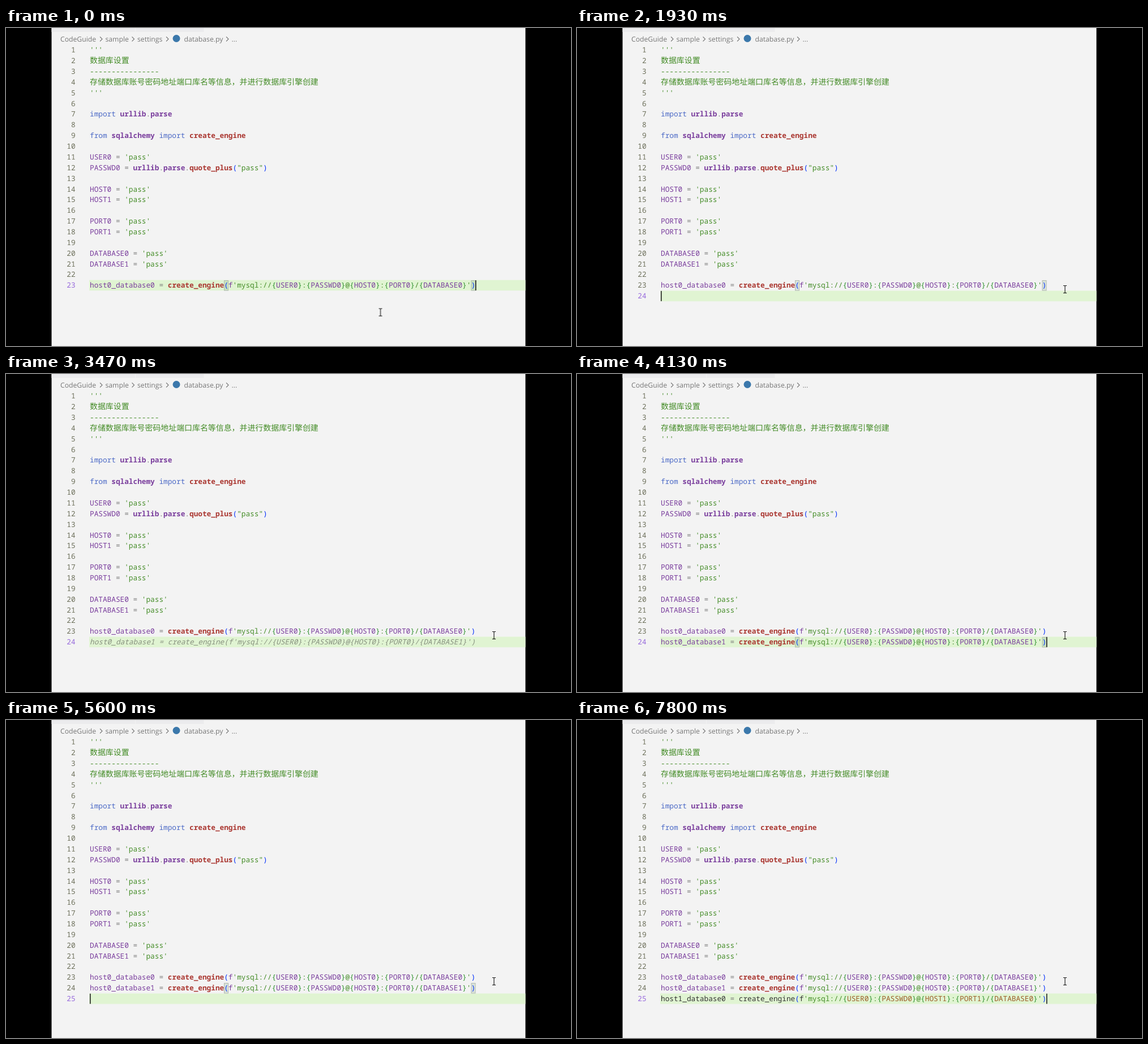
Animation of 998x561 px, one loop 8000 ms. Source, as an HTML page:

```html
<!DOCTYPE html>
<html lang="zh-CN">
<head>
<meta charset="utf-8">
<title>Editor completion</title>
<style>
html, body { margin: 0; width: 100%; height: 100%; overflow: hidden; background: #000; }
svg { display: block; width: 998px; height: 561px; }
text { font: 12.75px "Noto Sans Mono", "DejaVu Sans Mono", monospace; text-rendering: geometricPrecision; }
.crumb { font: 12.2px "Open Sans", "Noto Sans", sans-serif; fill: #777; }
.chev { fill: none; stroke: #777; stroke-width: 1.1; }
.num { fill: #6d705b; text-anchor: end; }

/* syntax colours */
.key { fill: #4b69c6; }
.mod { fill: #7a3e9d; font-weight: 700; }
.fn { fill: #aa3731; font-weight: 700; }
.str { fill: #448c27; }
.cjk { font: 13.93px "Noto Sans CJK SC", "Noto Sans CJK", sans-serif; fill: #448c27; }
.par { fill: #0431fa; }
.brace { fill: #319331; }
.const, .var { fill: #7a3e9d; }
.op { fill: #777; }
.raw .const { fill: #9c5d27; }
.raw .var, .raw .fn { fill: #333; font-weight: 400; }
.ghost text { fill: #87917f; font-style: italic; font-weight: 400; }

/* one shared 8 s timeline, 1% = 80 ms */
.t { animation: 8s step-end infinite; }
#bar { animation-name: bar; }
#match { animation-name: match; }
#caret { animation-name: caret; }
#mouse { animation: mouse 8s linear infinite; }
#n23 { animation-name: n23; }
#n24 { animation-name: n24; }
#n25 { animation-name: n25; }
#ghost24 { animation-name: ghost24; }
#raw24 { animation-name: raw24; }
#done24 { animation-name: done24; }
#ghost25 { animation-name: ghost25; }
#raw25 { animation-name: raw25; }

@keyframes bar {
  0% { transform: none; }
  23.375% { transform: translateY(18.87px); }
  69.125%, 100% { transform: translateY(37.74px); }
}
@keyframes match {
  0% { opacity: 1; transform: none; }
  26.625% { opacity: 0; transform: none; }
  51.625% { opacity: 1; transform: translateY(18.87px); }
  73.375%, 100% { opacity: 0; transform: translateY(18.87px); }
}
@keyframes caret {
  0%, 8.75%, 21.9% { opacity: 1; transform: translate(681px, 0); }
  2.5%, 15% { opacity: 0; transform: translate(681px, 0); }
  23.375%, 37.5% { opacity: 1; transform: translate(0, 18.87px); }
  30%, 42.5% { opacity: 0; transform: translate(0, 18.87px); }
  47.5%, 60% { opacity: 1; transform: translate(681px, 18.87px); }
  53.75%, 65.875% { opacity: 0; transform: translate(681px, 18.87px); }
  69.125%, 87.5% { opacity: 1; transform: translate(0, 37.74px); }
  75.375%, 93.75% { opacity: 0; transform: translate(0, 37.74px); }
  94.125%, 100% { opacity: 1; transform: translate(681px, 37.74px); }
}
@keyframes mouse {
  0%, .875% { transform: translate(661.5px, 501.5px); }
  6.625%, 7.875% { transform: translate(758px, 487px); }
  9.125%, 100% { transform: translate(862px, 461px); }
}
@keyframes n23 { 0% { fill: #9769dc; } 23.375%, 100% { fill: #6d705b; } }
@keyframes n24 {
  0% { opacity: 0; fill: #9769dc; }
  23.375% { opacity: 1; fill: #9769dc; }
  69.125%, 100% { opacity: 1; fill: #6d705b; }
}
@keyframes n25 { 0% { opacity: 0; fill: #9769dc; } 69.125%, 100% { opacity: 1; fill: #9769dc; } }
@keyframes ghost24 { 0%, 47.5%, 100% { opacity: 0; } 35% { opacity: 1; } }
@keyframes raw24 { 0%, 51.625%, 100% { opacity: 0; } 47.5% { opacity: 1; } }
@keyframes done24 { 0% { opacity: 0; } 51.625%, 100% { opacity: 1; } }
@keyframes ghost25 { 0%, 94.125%, 100% { opacity: 0; } 80.75% { opacity: 1; } }
@keyframes raw25 { 0% { opacity: 0; } 94.125%, 100% { opacity: 1; } }
</style>
</head>
<body>
<svg viewBox="0 0 998 561">
  <rect width="998" height="561"/>
  <rect x="80.5" width="837" height="561" fill="#f3f3f3"/>
  <rect x="80.5" width="269" height="7" fill="#ebebed"/>
  <rect x="228" width="1" height="7" fill="#f3f3f3"/>

  <text class="crumb" x="96" y="23.6">CodeGuide</text>
  <text class="crumb" x="175.5" y="23.6">sample</text>
  <text class="crumb" x="232" y="23.6">settings</text>
  <circle cx="301" cy="18.5" r="6.5" fill="#3b78ab"/>
  <text class="crumb" x="314.5" y="23.6">database.py</text>
  <text class="crumb" x="398.5" y="23.6">...</text>
  <path class="chev" d="M166 15.5l4 4-4 4M222.500 15.5l4 4-4 4M283 15.5l4 4-4 4M389 15.5l4 4-4 4"/>

  <rect id="bar" class="t" x="147" y="444.6" width="770.5" height="18.6" fill="#e0f4d2"/>
  <g id="match" class="t" fill="#006400" fill-opacity=".1" stroke="#b0b8ae">
    <rect x="385.500" y="445.500" width="7" height="17.500"/>
    <rect x="822" y="445.500" width="7" height="17.500"/>
  </g>
  <g id="code"></g>
  <rect id="caret" class="t" x="148" y="445" width="1.6" height="18" fill="#222"/>
  <path id="mouse" d="M-3-6.500h2q1 0 1 1q0-1 1-1h2M0-5.500v11M-3 6.500h2q1 0 1-1q0 1 1 1h2" fill="none" stroke="#111" stroke-width="1.1"/>
</svg>
<script>
const LEFT = 148, CHAR = 7.652, ROW = 18.87, FIRST = 43.2;
const root = document.getElementById('code');

const engine = (host, db) =>
  `host${host}_database${db} = create_engine(f'mysql://{USER0}:{PASSWD0}@{HOST${host}}:{PORT${host}}/{DATABASE${db}}')`;

const lines = [
  "'''", '数据库设置', '-'.repeat(16),
  '存储数据库账号密码地址端口库名等信息，并进行数据库引擎创建', "'''", '',
  'import urllib.parse', '',
  'from sqlalchemy import create_engine', '',
  "USER0 = 'pass'", 'PASSWD0 = urllib.parse.quote_plus("pass")', '',
  "HOST0 = 'pass'", "HOST1 = 'pass'", '',
  "PORT0 = 'pass'", "PORT1 = 'pass'", '',
  "DATABASE0 = 'pass'", "DATABASE1 = 'pass'", '',
  engine(0, 0)
];

const token = new RegExp([
  '(?<key>(?:import|from)\\b)',
  '(?<mod>urllib|parse|sqlalchemy)',
  '(?<fn>create_engine|quote_plus)',
  `(?<str>'pass'|"pass"|mysql://|-+|'''|[@:/'])`,
  '(?<cjk>[^\\x00-\\x7f]+)',
  '(?<par>[()])',
  '(?<brace>[{}])',
  '(?<const>[A-Z]+\\d)',
  '(?<var>\\w+)',
  '(?<op>[=.])'
].join('|'), 'g');

function add(parent, tag, attrs, text = '') {
  const el = document.createElementNS('http://www.w3.org/2000/svg', tag);
  for (const name in attrs) el.setAttribute(name, attrs[name]);
  el.textContent = text;
  return parent.appendChild(el);
}

function drawLine(row, code, attrs = {}) {
  const group = add(root, 'g', attrs);
  const y = FIRST + (row - 1) * ROW;
  for (const m of code.matchAll(token)) {
    const type = Object.keys(m.groups).find(k => m.groups[k]);
    add(group, 'text', { class: type, x: LEFT + m.index * CHAR, y }, m[0]);
  }
}

for (let row = 1; row <= 25; row++) {
  const attrs = { class: row > 22 ? 'num t' : 'num', x: 122.6, y: FIRST + (row - 1) * ROW };
  if (row > 22) attrs.id = 'n' + row;
  add(root, 'text', attrs, row);
}
lines.forEach((code, i) => drawLine(i + 1, code));

drawLine(24, engine(0, 1), { id: 'ghost24', class: 't ghost' });
drawLine(24, engine(0, 1), { id: 'raw24', class: 't raw' });
drawLine(24, engine(0, 1), { id: 'done24', class: 't' });
drawLine(25, engine(1, 0), { id: 'ghost25', class: 't ghost' });
drawLine(25, engine(1, 0), { id: 'raw25', class: 't raw' });
</script>
</body>
</html>
```
